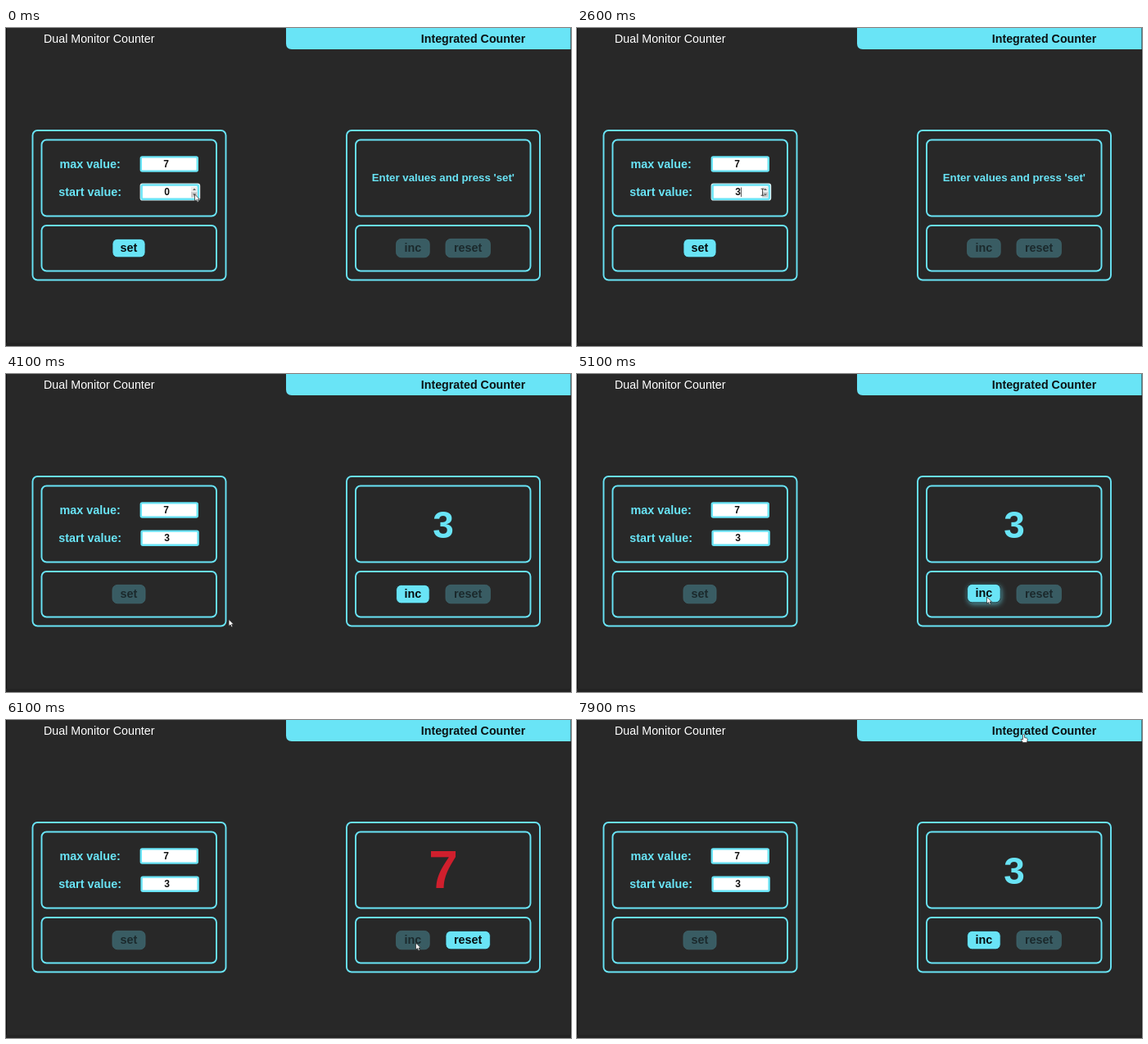
An HTML page that plays this animation: 690x388 px, repeating every 8000 ms.

```html
<!DOCTYPE html>
<html lang="en">
<head>
<meta charset="utf-8">
<title>Counter</title>
<style>
  html, body { margin: 0; width: 100%; height: 100%; overflow: hidden; background: #282828; }
  svg { display: block; width: 690px; height: 388px; }
  text { font: bold 14.4px "Liberation Sans", Arial, sans-serif; }
  .mid { text-anchor: middle; }
</style>
</head>
<body>
<svg id="stage" viewBox="0 0 690 388"></svg>
<script>
const CYAN = '#69e4f6', RED = '#d01f2d', BG = '#282828', LOOP = 8000;
const stage = document.getElementById('stage');

function add(tag, attrs, parent = stage) {
  const el = document.createElementNS('http://www.w3.org/2000/svg', tag);
  set(el, attrs);
  parent.appendChild(el);
  return el;
}
function set(el, attrs) {
  for (const key in attrs) el.setAttribute(key, attrs[key]);
}
function box(x, y, width, height, rx, attrs, parent) {
  return add('rect', { x, y, width, height, rx, ...attrs }, parent);
}
function label(text, x, y, size, fill, cls = 'mid', parent) {
  const el = add('text', { x, y, fill, class: cls }, parent);
  el.style.fontSize = size + 'px';
  el.textContent = text;
  return el;
}
const show = (el, on) => set(el, { visibility: on ? 'visible' : 'hidden' });
const clamp = v => Math.min(1, Math.max(0, v));
const ramp = (t, at, length = 200) => clamp((t - at) / length);
const ease = k => (1 - Math.cos(Math.PI * k)) / 2;
const mix = (a, b, k) => `rgb(${a.map((v, i) => Math.round(v + (b[i] - v) * k))})`;

// Page
box(0, 0, 1, 388, 0, { fill: '#101010' });
box(689, 0, 1, 388, 0, { fill: '#1c1c1c' });
box(0, 384, 690, 4, 0, { fill: '#232323' });
add('path', { d: 'M342 0V19Q342 26 349 26H689.5V0Z', fill: CYAN });
label('Dual Monitor Counter', 46, 17.5, 14.25, '#fff', '').style.fontWeight = 'normal';
label('Integrated Counter', 570.5, 17.5, 14.25, '#0b1214');

for (const x of [32.5, 416]) {
  const line = { fill: 'none', stroke: CYAN, 'stroke-width': 1.9 };
  box(x, 125, 236, 182.5, 6, line);
  box(x + 11, 136.5, 213.5, 93, 6, line);
  box(x + 11, 241, 213.5, 55.5, 6, line);
}

// Form
const input = (x, y) => box(x, y, 69, 17.2, 1.5, { fill: '#fff', stroke: CYAN, 'stroke-width': 2.4 });
label('max value:', 102.7, 171, 14.4, CYAN);
const startLabel = label('start value:', 102.7, 205, 14.4, CYAN);
input(164.8, 157.4);
label('7', 195.5, 170.4, 12, '#111');
const ring = box(164.2, 190.2, 72.4, 19.8, 2.5, { fill: CYAN, stroke: '#e4f6f9', 'stroke-width': 1.2 });
const field = input(165.6, 191.6);
const startText = label('0', 196.7, 204.4, 12, '#111');
const caret = box(200, 194.5, .9, 11.5, 0, { fill: '#444' });
const spin = add('g', {});
box(226, 194, 7.5, 12.5, 0, { fill: '#ececec' }, spin);
const spinHot = box(226, 200, 7.5, 6.5, 0, { fill: '#cdcdcd' }, spin);
add('path', { d: 'M228 198l2-2.4 2 2.4ZM228 202.3l2 2.4 2-2.4Z', fill: '#666' }, spin);

// Display
const message = label('', 533.9, 187.2, 13.25, CYAN);
const count = label('', 534, 200, 46, CYAN);

function button(text, x, width) {
  const g = add('g', {});
  const face = box(x, 257.4, width, 22.4, 6, { 'stroke-width': .8 }, g);
  const caption = label(text, x + width / 2, 273.3, 14.4, '#000', 'mid', g);
  return (on, hover) => {
    set(g, { transform: `translate(0 ${-hover})` });
    face.style.filter = hover
      ? `drop-shadow(1px 2px 3px rgba(105,228,246,${.6 * hover}))`
      : '';
    set(face, {
      fill: mix([57, 92, 99], [105, 228, 246], on),
      stroke: mix([64, 104, 111], [26, 40, 43], on)
    });
    set(caption, { fill: mix([27, 41, 44], [6, 12, 14], on) });
  };
}
const setButton = button('set', 130, 40);
const incButton = button('inc', 476.6, 40.6);
const resetButton = button('reset', 537, 54.4);

// Pointer
const ink = { fill: '#fff', stroke: '#222', 'stroke-width': .7 };
const pointer = add('g', {});
const arrow = add('path', { d: 'M0 0V8.2L2 6.5 3.3 9.4 4.8 8.8 3.5 6H6Z', ...ink }, pointer);
const beam = add('path', {
  d: 'M-2 -4H2M0 -4V4M-2 4H2', fill: 'none', stroke: '#333', 'stroke-width': .9
}, pointer);
const hand = add('path', {
  d: 'M-1 0Q0 -1 1 0V3.4L4 4.2Q5 4.6 4.7 6L4 9.5H-1L-3.4 5.8Q-3 4.6 -1 6Z', ...ink
}, pointer);

const home = { x: 230.5, y: 203 };
const moves = [
  { from: 900, to: 1300, x: 230.5, y: 196.5 },
  { from: 2500, to: 3200, x: 151.5, y: 272 },
  { from: 3700, to: 4700, x: 500.5, y: 272, sag: 31 },
  { from: 6200, to: 6700, x: 561, y: 271 },
  { from: 7100, to: 7900, x: 545.5, y: 18 }
];
function pointerAt(t) {
  let { x, y } = home;
  for (const m of moves) {
    const k = ease(ramp(t, m.from, m.to - m.from));
    x += (m.x - x) * k;
    y += (m.y - y) * k + (m.sag || 0) * Math.sin(Math.PI * k);
  }
  return { x, y };
}

// Clicks
const stepDown = 400, stepUps = [1500, 2000, 2300, 2600];
const setClick = 3300, resetClick = 6800, MAX = 7;
const incTime = n => 5200 + 230 * n;
const lastInc = incTime(3);

function drawForm(t, wrong, tone) {
  const value = stepUps.filter(at => at <= t).length - (t >= stepDown);
  startText.textContent = value;
  set(startText, { fill: wrong ? RED : '#111' });
  set(startLabel, { fill: tone });
  set(field, { stroke: tone });
  set(ring, { fill: tone });
  show(ring, t < setClick);
  show(caret, t >= 2600 && t < 3100);
}

function drawDisplay(t, wrong, tone) {
  const ready = t > setClick, incs = Math.floor((t - incTime(0)) / 230) + 1;
  const n = t > resetClick ? 3 : Math.min(MAX, 3 + Math.max(0, incs));
  const top = n === MAX;
  message.textContent = ready ? '' : wrong ? 'Danger! Incorrect value!' : "Enter values and press 'set'";
  set(message, { fill: tone });
  count.textContent = ready ? n : '';
  count.style.fontSize = top ? '64px' : '46px';
  set(count, { fill: top ? RED : CYAN, y: top ? 205 : 200 });
}

function drawButtons(t) {
  const hover = (from, to) => ramp(t, from) - ramp(t, to, 100);
  setButton(t < stepDown ? 1 : ramp(t, 1400) - ramp(t, setClick), hover(3000, setClick));
  incButton(ramp(t, setClick) - ramp(t, lastInc) + ramp(t, resetClick), hover(4600, lastInc));
  resetButton(ramp(t, 5100) - ramp(t, resetClick), hover(6500, resetClick));
}

function drawPointer(t) {
  const { x, y } = pointerAt(t);
  const overField = x > 164 && x < 236 && y > 190 && y < 210, overLink = y < 26;
  const typing = overField && t >= 2600;
  set(pointer, { transform: `translate(${x} ${y})` });
  show(beam, typing);
  show(hand, overLink);
  show(arrow, !typing && !overLink);
  show(spin, overField);
  set(spinHot, { y: y > 200 ? 200 : 194 });
}

function draw(time) {
  const t = Math.floor(time / 100) * 100;
  const wrong = t >= stepDown && t < stepUps[0], tone = wrong ? RED : CYAN;
  drawForm(t, wrong, tone);
  drawDisplay(t, wrong, tone);
  drawButtons(t);
  drawPointer(t);
}

const begin = performance.now();
function tick() {
  draw((performance.now() - begin) % LOOP);
  requestAnimationFrame(tick);
}
tick();
</script>
</body>
</html>
```
